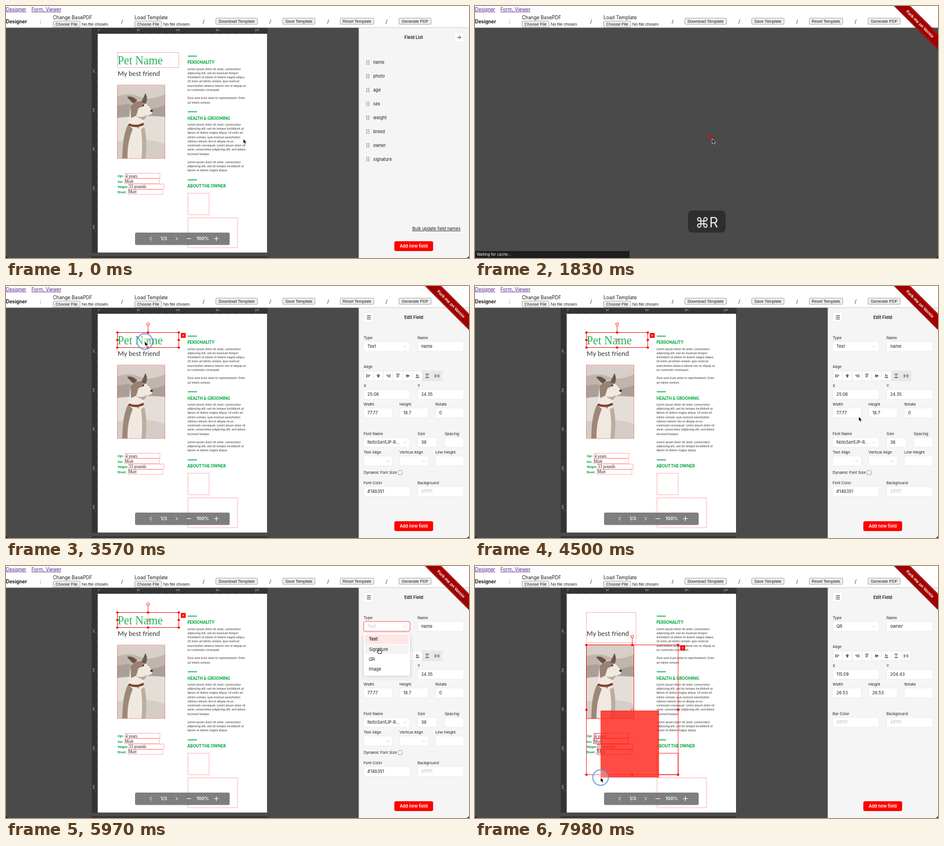
These frames come from a looping animation (800x436 px, 8 s). An HTML page:

```html
<!DOCTYPE html>
<html lang="en">
<head>
<meta charset="utf-8">
<title>Template designer</title>
<style>
html, body { margin: 0; width: 800px; height: 436px; overflow: hidden; background: #111; }
svg { display: block; }
body > svg { border-radius: 0 0 5px 5px; }
text { white-space: pre; }
.ui { font-family: Inter, "DejaVu Sans", sans-serif; }
.form { font-family: "Liberation Sans", sans-serif; }
.doc { font-family: Lato, sans-serif; }
.serif { font-family: "Liberation Serif", serif; }
</style>
</head>
<body>
<script>
const LOOP = 8000, RED = '#f00', GREEN = '#12ab4b';

const text = (x, y, s, size = 7.35, more = '') =>
  `<text x="${x}" y="${y}" font-size="${size}" ${more}>${s}</text>`;
const rect = (x, y, x2, y2, more = '') =>
  `<rect x="${x}" y="${y}" width="${x2 - x}" height="${y2 - y}" ${more}/>`;
const line = (d, color, width = 1, more = '') =>
  `<path d="${d}" fill="none" stroke="${color}" stroke-width="${width}" ${more}/>`;
const group = (id, body, more = '') => `<g id="${id}" ${more}>${body}</g>`;
const MID = 'text-anchor="middle"', BOLD = 'font-weight="600"';

// Page header
function header() {
  const button = (x, x2, y, label) =>
    rect(x, y, x2, y + 10.6, 'rx="1.6" fill="#efefef" stroke="#777" stroke-width=".6"') +
    text((x + x2) / 2, y + 7.9, label, 7.15, MID + ' class="form"');
  const file = (x, label) => text(x, 23.3, label, 8.25) + button(x + .3, x + 47, 26, 'Choose File') +
    text(x + 50, 33.9, 'No file chosen', 7.15, 'class="form"');
  const link = 'fill="#551a8b" text-decoration="underline"';
  return rect(0, 0, 800, 37.5, 'fill="#fff"') +
    text(0, 8.8, 'Designer', 8.25, link) + text(44, 8.8, 'Form, Viewer', 8.25, link) +
    text(0, 29.5, 'Designer', 8.25, 'font-weight="700"') + text(58.5, 29.5, ':', 8.25) +
    [199, 340, 455, 555, 656].map(x => text(x, 29.8, '/', 8.6)).join('') +
    file(81, 'Change BasePDF') + file(222, 'Load Template') +
    button(362.5, 434.5, 21, 'Download Template') + button(478, 534, 21, 'Save Template') +
    button(577.5, 635.5, 21, 'Reset Template') + button(679, 734.5, 21, 'Generate PDF');
}

// Document
const fields = {
  name: [192.5, 80.5, 298.5, 106.5], photo: [192.5, 136.5, 274.5, 264],
  age: [206, 289.5, 266, 298], sex: [205, 298.5, 265, 307.5],
  weight: [212, 308, 273, 317], breed: [211, 317.5, 271, 326],
  owner: [314.5, 324, 351, 361], signature: [314.5, 366.5, 400, 418]
};
const signed = [192.5, 80.5, 278, 132.5];
const dashed = b => rect(...b, `fill="none" stroke="${RED}" stroke-width=".55" stroke-dasharray="1.4 1.2"`);

function rulers() {
  let d = '';
  for (let i = 0; i <= 21; i++) d += `M${159 + i * 13.6} 47.5v${i % 5 ? -2 : -5}`;
  for (let i = 0; i <= 27; i++) d += `M158 ${48 + i * 13.6}h${i % 5 ? -2 : -5}`;
  const num = (n, x, y, turn = 0) =>
    `<g transform="translate(${x} ${y}) rotate(${turn})">${text(0, 0, n, 4, MID + ' fill="#ddd"')}</g>`;
  let s = rect(148, 37.5, 452, 48, 'fill="#343434"') + rect(148, 37.5, 158.5, 427, 'fill="#343434"') +
    rect(148, 433, 452, 436, 'fill="#343434"') + line(d, '#777', .5);
  for (let i = 0; i <= 4; i++) s += num(i * 50, 160.5 + i * 68.3, 42.5);
  for (let i = 1; i <= 5; i++) s += num(i * 50, 153, 45 + i * 67.5, -90);
  return s;
}

function photo() {
  const shape = (d, fill) => `<path d="${d}" fill="${fill}"/>`;
  return '<svg x="192" y="136.5" width="83" height="127.5" viewBox="0 0 83 127">' +
    rect(0, 0, 83, 127, 'fill="url(#sky)"') +
    shape('M0 20Q20 12 38 20T83 16V40H0Z', '#c0b5ac') +
    shape('M0 36Q22 30 44 37T83 34V56Q40 52 0 58Z', '#aba097') +
    shape('M0 57Q40 51 83 55V127H0Z', '#e4deD8') +
    shape('M0 98Q40 88 83 102V127H0Z', '#d5cdc6') +
    // body, back and chest shading
    shape('M20 64Q10 88 9 127H49Q53 104 47 70Z', '#efe9e2') +
    shape('M19 68Q9 88 9 127H18Q17 100 27 76Z', '#9d8877') +
    shape('M47 72Q53 95 49 127H42Q45 98 41 77Z', '#bcae9f') +
    // head
    shape('M23 35Q32 24 45 27L54 36 61 44 60 50 53 53 47 53 46 70 20 68Z', '#f0e9e1') +
    shape('M23 36Q34 25 46 28L47 36 37 40 33 53 24 57Z', '#9a8272') +
    shape('M28 32L17 21Q25 17 35 27Z', '#66534a') + shape('M42 29L49 14Q54 24 49 33Z', '#6e5a4e') +
    shape('M33 54Q43 57 52 53L46 61Z', '#b9a899') +
    '<ellipse cx="59.5" cy="44.5" rx="2.2" ry="2" fill="#352d29"/><circle cx="45" cy="35.5" r="1.3" fill="#29221f"/>' +
    line('M20 68Q33 74 46 67', '#84402d', 4) + '<circle cx="36" cy="73.5" r="1.5" fill="#a88253"/></svg>';
}

const lorem = 'Lorem ipsum dolor sit amet, consectetur';
const health = [lorem, 'adipiscing elit, sed do tempor incididunt ut'];
const para = (y, lines) => lines.map((s, i) =>
  text(313.5, y + i * 7.22, s, 5.25, 'fill="#3c3c3c" class="doc"')).join('');
const section = (y, title) => line(`M314 ${y}h16`, GREEN, 1.5) +
  text(313.5, y + 13.5, title, 6.8, `font-weight="900" fill="${GREEN}" class="doc"`);

function documentPage() {
  const value = (key, label, y, s) =>
    text(193, y, label, 4.9, `font-weight="900" fill="${GREEN}" class="doc"`) +
    text(fields[key][0] + .6, y + .4, s, 7.2, 'fill="#222" class="serif"');
  return rulers() + rect(158.5, 48, 451, 426.5, 'fill="#fff"') +
    text(193, 121, 'My best friend', 11.4, 'fill="#333" class="doc"') + photo() +
    value('age', 'Age:', 296.2, '4 years') + value('sex', 'Sex:', 305.5, 'Male') +
    value('weight', 'Weight:', 314.8, '33 pounds') + value('breed', 'Breed:', 324, 'Mutt') +
    section(86.7, 'PERSONALITY') + section(183, 'HEALTH &amp; GROOMING') + section(300.8, 'ABOUT THE OWNER') +
    para(110.8, [lorem, 'adipiscing elit, sed do eiusmod tempor', 'incididunt ut labore et dolore magna aliqua.',
      'Ut enim ad minim veniam, quis nostrud', 'exercitation ullamco laboris nisi ut aliquip ex',
      'ea commodo consequat.', '', 'Duis aute irure dolor in reprehenderit. Enim', 'ad minim veniam.']) +
    para(207, [...health, 'labore et dolore magna aliqua. Ut enim ad', 'minim veniam, quis nostrud exercitation',
      'ullamco laboris nisi ut aliquip ex ea', 'commodo consequat. Lorem ipsum dolor sit',
      'amet, consectetur adipiscing elit, sed dolore', 'eiusmod tempor.', '', ...health,
      'labore et dolore magna aliqua.']) +
    Object.keys(fields).slice(1).map(k => dashed(fields[k])).join('') +
    group('petName', text(192.7, 101, 'Pet Name', 20, `fill="#26b35b" class="serif"`) + dashed(fields.name)) +
    group('petSigned', dashed(signed));
}

function pager() {
  return rect(223, 392, 386.5, 413.5, 'rx="2.5" fill="#666" fill-opacity=".84"') +
    line('M252 399.5l-3.5 3 3.5 3M293 399.5l3.5 3-3.5 3M312 402.5h8M359.5 402.5h8M363.5 398.5v8', '#fff', 1) +
    text(272.5, 405.4, '1/3', 7.8, `${MID} ${BOLD} fill="#fff"`) +
    text(340, 405.4, '100%', 7.8, `${MID} ${BOLD} fill="#fff"`);
}

// Sidebar
const heading = s => text(704.5, 56.8, s, 7.4, `${MID} ${BOLD}`);
const iconBox = x => rect(x, 46, x + 16.5, 62.5, 'rx="3" fill="#fff" stroke="#e4e4e4" stroke-width=".6"');

function fieldList() {
  let s = heading('Field List') + iconBox(774.5) + line('M779.5 54.3h6.5m-2.8-2.8l2.8 2.8-2.8 2.8', '#222', .9);
  Object.keys(fields).forEach((key, i) => {
    const y = 97.6 + i * 23.9;
    for (let k = 0; k < 6; k++)
      s += `<circle cx="${623.5 + k % 2 * 3.4}" cy="${y - 2.8 + (k >> 1) * 2.8}" r=".75" fill="#333"/>`;
    s += text(634.5, y + 2.6, key);
  });
  return s + text(702, 387.8, 'Bulk update field names', 7.35, 'text-decoration="underline"');
}

const label = (x, y, s) => text(x, y, s, 6.5);
const input = (x, x2, y, s = '', faint = false) =>
  rect(x, y, x2, y + 17, 'rx="3" fill="#fff" stroke="#e2e2e2" stroke-width=".6"') +
  text(x + 6.5, y + 11.2, s, 7.35, faint ? 'fill="#c4c4c4"' : '');
const select = (x, x2, y, s) => input(x, x2, y, s) +
  line(`M${x2 - 11} ${y + 7.5}l2.5 2.5 2.5-2.5`, '#bbb', .8);
const icons = ['M-3-3V3M-1.5-1.2H3M-1.5 1.2H1.5', 'M0-3V3M-3-1.2H3M-2 1.2H2', 'M3-3V3M-3-1.2H1.5M-1.5 1.2H1.5',
  'M-3-3H3M-1.2-1.5V3M1.2-1.5V1.5', 'M-3 0H3M-1.2-3V3M1.2-2V2', 'M-3 3H3M-1.2-3V1.5M1.2-1.5V1.5',
  'M-3-3H3M-3 3H3M-1.5 0H1.5', 'M-3-3V3M3-3V3M0-1.5V1.5'];

function editor(type, name, [x, y, w, h, turn], extra = '', many = false) {
  return heading('Edit Field') + iconBox(618.5) + line('M623.5 51.5h7M623.5 54.3h7M623.5 57.1h7', '#222', .9) +
    label(618, 91.6, 'Type') + select(618, 698, 96, type) + label(711, 91.6, 'Name') + input(711, 791, 96, name) +
    label(618, 142.2, 'Align') + icons.map((d, i) => {
      const left = 618 + i * 16.9;
      return rect(left, 147, left + 16.9, 164,
        `fill="${i > 5 && !many ? '#e9e9e9' : '#fff'}" stroke="#dedede" stroke-width=".6"`) +
        line(d, '#222', 1, `transform="translate(${left + 8.4} 155.5)"`);
    }).join('') +
    label(618, 174.8, 'X') + input(618, 698, 179, x) + label(711, 174.8, 'Y') + input(711, 791, 179, y) +
    label(618, 207.3, 'Width') + input(618, 668, 211, w) + label(680, 207.3, 'Height') + input(680, 730, 211, h) +
    label(742, 207.3, 'Rotate') + input(742, 791, 211, turn) + extra;
}

const textStyle = label(618, 257.6, 'Font Name') + select(618, 698, 262, 'NotoSerifJP-R...') +
  label(711, 257.6, 'Size') + input(711, 745, 262, '36') + label(758, 257.6, 'Spacing') + input(758, 791, 262) +
  label(618, 290, 'Text Align') + select(618, 668, 294, '') +
  label(680, 290, 'Vertical Align') + select(680, 730, 294, '') +
  label(742, 290, 'Line Height') + input(742, 791, 294) +
  label(618, 325, 'Dynamic Font Size') +
  rect(677.5, 319.3, 684.5, 326.3, 'rx="1.2" fill="#fff" stroke="#777" stroke-width=".7"') +
  label(618, 343, 'Font Color') + input(618, 698, 347, '#14b351') +
  label(711, 343, 'Background') + input(711, 791, 347, '#ffffff', true);
const barStyle = label(618, 257.6, 'Bar Color') + input(618, 698, 262, '#ffffff', true) +
  label(711, 257.6, 'Background') + input(711, 791, 262, '#ffffff', true);

function dropdown() {
  const items = ['Text', 'Signature', 'QR', 'Image'];
  return rect(618, 96, 698, 113, `rx="3" fill="#fff" stroke="#ff4d4f" stroke-width=".9"`) +
    text(624.5, 107.2, 'Text', 7.35, 'fill="#c4c4c4"') + line('M687 103.5l2.5 2.5 2.5-2.5', '#bbb', .8) +
    rect(618, 116.5, 698, 190, 'rx="4" fill="#fff" filter="url(#shadow)"') +
    rect(620, 118.5, 696, 135, 'rx="2" fill="#ffe5e3"') +
    group('hover', rect(620, 136, 696, 152, 'rx="2" fill="#f4f4f4"')) +
    items.map((s, i) => text(627, 129.3 + i * 17.3, s, 7.35, i ? '' : BOLD)).join('');
}

function sidebar() {
  return rect(609.5, 37.5, 800, 436, 'fill="#f5f5f5"') +
    group('list', fieldList()) +
    group('editText', editor('Text', 'name', ['25.06', '24.35', '77.77', '18.7', '0'], textStyle)) +
    group('editSign', editor('Signature', 'name', ['25.06', '24.35', '62.5', '37.5', '0'])) +
    group('editPhoto', editor('Image', 'photo', ['24.99', '65.38', '60.66', '93.78', ''], '', true)) +
    group('editOwner', editor('QR', 'owner', ['115.09', '204.43', '26.53', '26.53', ''], barStyle, true)) +
    group('menu', dropdown()) +
    rect(671, 407, 738, 424, `rx="3" fill="${RED}"`) +
    text(704.5, 418.2, 'Add new field', 7.35, `${MID} ${BOLD} fill="#fff"`);
}

const ribbon = '<g transform="translate(769 31) rotate(45)">' +
  rect(-70, -10, 70, 10, 'fill="url(#band)"') +
  line('M-70-8.7H70M-70 8.7H70', '#e9b5b5', .5, 'stroke-dasharray="1.4 1"') +
  text(0, 2.6, 'Fork me on Vornix', 7.4, `${MID} font-weight="700" fill="#fff" class="form"`) + '</g>';

const keycast = rect(368, 354, 433, 392, 'rx="7" fill="#2e2e2c"') +
  text(400.5, 382.5, '⌘R', 24, `${MID} fill="#e6e6e6"`);
const status = rect(0, 424, 267, 436, 'fill="#1d1e20"') + text(3, 432.4, 'Waiting for cache...', 6.5, 'fill="#fff"');

document.body.innerHTML = `<svg class="ui" width="800" height="436" viewBox="0 0 800 436" fill="#1c1c1c">
  <defs>
    <linearGradient id="sky" x2="0" y2="1"><stop stop-color="#d9d0c9"/><stop offset="1" stop-color="#cec5bd"/></linearGradient>
    <linearGradient id="band" x2="0" y2="1"><stop stop-color="#a80000"/><stop offset="1" stop-color="#900"/></linearGradient>
    <filter id="shadow" x="-20%" y="-20%" width="140%" height="140%">
      <feDropShadow dx="0" dy="2" stdDeviation="3" flood-opacity=".2"/></filter>
  </defs>
  ${rect(0, 37, 800, 436, 'fill="#4a4a4a"')}
  ${group('app', documentPage() + group('pick', '') + pager() + sidebar())}
  ${group('loading', line('M401 224.5A10.5 10.5 0 0 1 410.5 230.5', RED, 2.4, 'id="arc"') + status)}
  ${header()}
  ${group('ribbon', ribbon)}
  ${group('keys', keycast)}
  ${group('cursor', '<circle id="ring" r="13.5" fill="#fff" fill-opacity=".25" stroke="#5b8fd9" stroke-width="1.5"/>' +
    '<path id="arrow" d="M0 0V8L1.9 6.4 3.2 9.2 4.6 8.5 3.4 5.9H6Z" fill="#000" stroke="#fff" stroke-width=".7"/>' +
    '<path id="hand" d="M-1 1Q0-.6 1 1V4L4 4.8Q5 5.2 4.6 7L3.8 9.5H-1.2L-3.5 6Q-3.4 4.6-1 6Z" fill="#fff" stroke="#000" stroke-width=".9"/>')}
</svg>`;

// Motion
const $ = Object.fromEntries([...document.querySelectorAll('g[id], path[id], circle[id]')].map(e => [e.id, e]));
const show = (id, on) => $[id].style.display = on ? '' : 'none';
const within = (t, a, b) => t >= a && t < b;
const path = [[0, 410, 230], [2750, 410, 230], [3450, 240, 96], [3990, 240, 96], [4450, 663, 226], [5060, 663, 226],
  [5450, 655, 106], [5600, 655, 106], [5850, 644.5, 142], [6300, 644.5, 142], [6780, 376, 130.5], [7000, 376, 130.5],
  [7320, 318, 250], [7420, 318, 250], [7950, 217, 366], [8000, 217, 366]];

function pointer(t) {
  const i = path.findIndex(p => p[0] > t);
  const [t0, x0, y0] = path[i - 1], [t1, x1, y1] = path[i];
  const u = (t - t0) / (t1 - t0), e = u * u * (3 - 2 * u);
  return [x0 + (x1 - x0) * e, y0 + (y1 - y0) * e];
}

function frame(box) {
  const [x, y, x2, y2] = box, cx = (x + x2) / 2, cy = (y + y2) / 2;
  const dot = (a, b) => `<circle cx="${a}" cy="${b}" r="2.1" fill="${RED}"/>`;
  const open = (a, b, r) => `<circle cx="${a}" cy="${b}" r="${r}" fill="#fff" stroke="${RED}" stroke-width=".9"/>`;
  return rect(...box, `fill="none" stroke="${RED}" stroke-width=".8"`) +
    line(`M${cx} ${y}v-13`, RED, .8) + open(cx, y - 14.3, 2.3) + open(cx, cy, 1.8) +
    [x, cx, x2].map(a => dot(a, y) + dot(a, y2)).join('') + dot(x, cy) + dot(x2, cy) +
    rect(x2 + 3.5, y + .8, x2 + 12, y + 9.3, `rx="1" fill="${RED}"`) +
    line(`M${x2 + 6.2} ${y + 3.5}l3.1 3.1m0-3.1l-3.1 3.1`, '#fff', .8);
}

function draw(now) {
  const t = now % LOOP, [px, py] = pointer(t);
  const loading = within(t, 1560, 2430), dragging = t >= 7340;
  const editing = within(t, 3520, 6270), signing = within(t, 6270, 6850);

  let hits = [], pick = '';
  if (dragging) {
    hits = Object.keys(fields).slice(1).filter(k => {
      const [x, y, x2, y2] = fields[k];
      return x < 318 && x2 > px && y < py && y2 > 250;
    });
    if (hits.length) {
      const b = hits.map(k => fields[k]);
      const edge = (i, f) => f(...b.map(v => v[i]));
      pick = b.map(v => rect(...v, `fill="none" stroke="${RED}" stroke-width=".6"`)).join('') +
        frame([edge(0, Math.min), edge(1, Math.min), edge(2, Math.max), edge(3, Math.max)]);
    }
    pick += rect(px, 250, 318, py, 'fill="#ff2a22" fill-opacity=".84"');
  } else if (editing) pick = frame(fields.name);
  else if (signing) pick = frame(signed);
  $.pick.innerHTML = pick;

  show('app', !loading);
  show('loading', loading);
  $.arc.setAttribute('transform', `rotate(${(t - 1830) * .36} 401 235)`);
  show('ribbon', t >= 1560);
  show('keys', within(t, 1500, 2480));
  show('petName', t < 6270);
  show('petSigned', t >= 6270);
  show('list', !editing && !signing && !hits.length);
  show('editText', editing);
  show('editSign', signing);
  show('editOwner', hits.includes('owner'));
  show('editPhoto', hits.length && !hits.includes('owner'));
  show('menu', within(t, 5540, 6270));
  show('hover', t > 5780);

  const hand = within(t, 5400, 6330);
  show('hand', hand);
  show('arrow', !hand);
  show('ring', dragging || [3480, 5500, 6220, 6820].some(c => within(t, c, c + 150)));
  $.cursor.setAttribute('transform', `translate(${px} ${py})`);
}

const start = performance.now();
function tick() {
  draw(performance.now() - start);
  requestAnimationFrame(tick);
}
tick();
</script>
</body>
</html>
```
